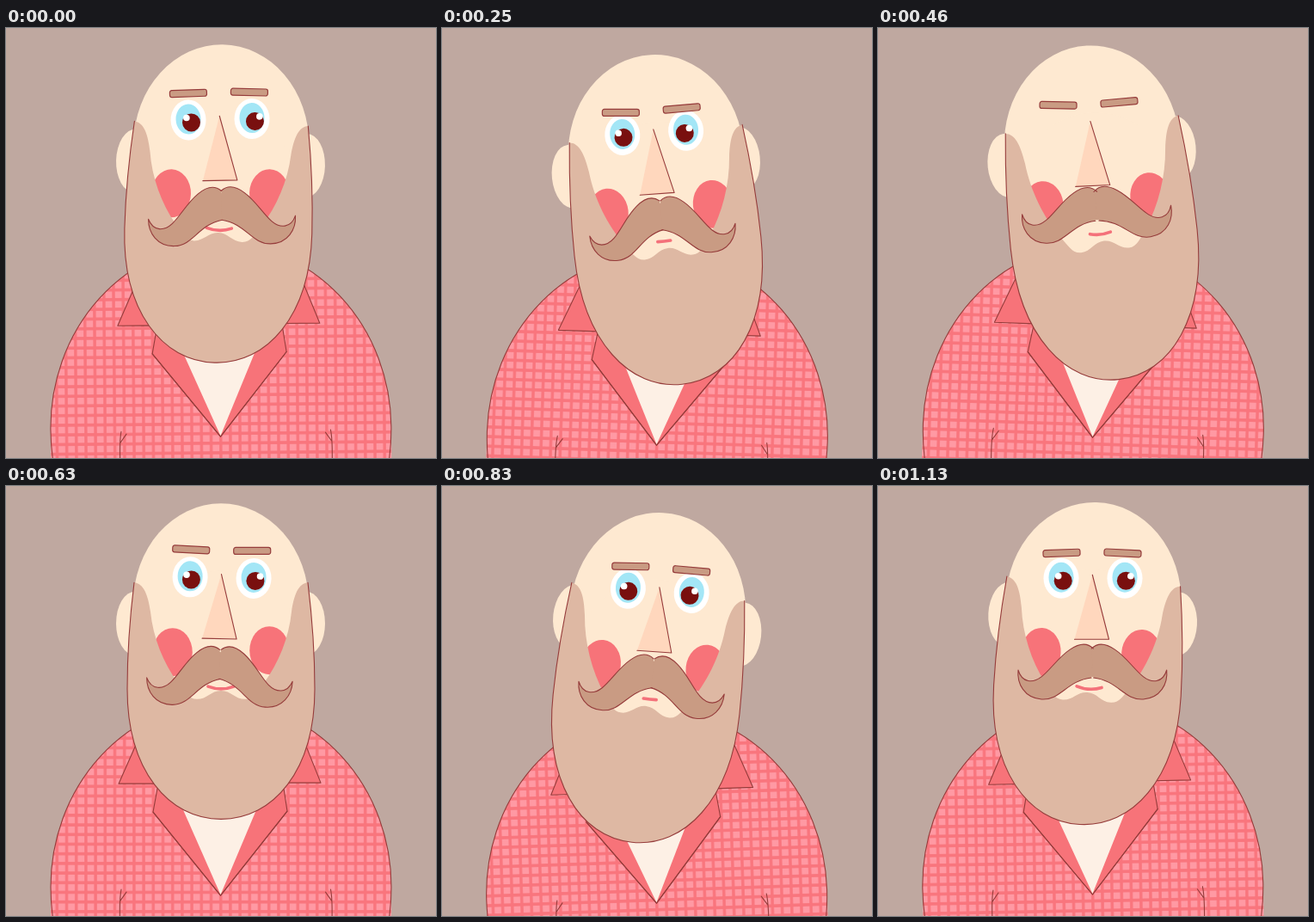
Animation, 500 px wide and 500 px high, one loop 1180 ms. Source, as an HTML page:

```html
<!DOCTYPE html>
<html lang="en">
<head>
<meta charset="utf-8">
<title>Bearded man bobbing</title>
<style>
  html, body { margin: 0; width: 100%; height: 100%; overflow: hidden; background: #bfa8a0; }
  svg { display: block; width: 100vw; height: 100vh; }
  .line { fill: none; stroke: #963c3b; stroke-width: 1.1; stroke-linejoin: round; stroke-linecap: round; }
  .skin { fill: #fee9d1; }
  .pink { fill: #f77379; }
  .hair { fill: #c99b83; }
  .collar { fill: #f77379; stroke: #963c3b; stroke-width: 1.1; stroke-linejoin: round; }
</style>
</head>
<body>
<svg viewBox="0 0 500 500">
  <defs>
    <pattern id="plaid" x="81.7" y="370.5" width="11.2" height="11.2" patternUnits="userSpaceOnUse">
      <rect width="11.2" height="11.2" fill="#f9757d"/>
      <rect x="1.7" y="1.8" width="7.8" height="7.6" fill="#ff99a3"/>
    </pattern>
    <path id="wing" d="M0,1 C-8,-6 -17,-4 -27,4 C-40,14 -48,29 -58,38 C-67,46 -80,47 -85.5,32 C-86,48 -76,64 -56,64 C-34,64 -28,40 0,35"/>
    <g id="sleeve">
      <path class="line" d="M134,468 C132,478 132,490 133,540 M133,481 L140,471"/>
    </g>
  </defs>
  <rect width="500" height="500" fill="#bfa8a0"/>

  <g id="shirt">
    <path d="M52,560 V465 A198,215 0 0 1 448,465 V560 Z" fill="url(#plaid)"/>
    <path class="line" d="M55,505 Q52,485 52,465 A198,215 0 0 1 448,465 Q448,485 445,505"/>
    <use href="#sleeve"/>
    <use href="#sleeve" transform="translate(511.5) scale(-1 1)"/>
    <path class="collar" d="M158,284 L131,345 H177 L171,378 L249.5,475 L327,377 L322,344 H366 L342,284 Z"/>
    <path d="M193.5,347 L249.5,474 L303,347 Z" fill="#fdf0e5"/>
    <path class="line" d="M171,378 L249.5,475 L327,377"/>
  </g>

  <g id="head">
    <g id="ears">
      <ellipse class="skin" cx="150" cy="157" rx="22" ry="37"/>
      <ellipse class="skin" cx="349" cy="157" rx="22" ry="37"/>
    </g>
    <ellipse id="skull" class="skin" cx="250" cy="135" rx="102" ry="116"/>
    <ellipse class="skin" cx="250" cy="192" rx="92" ry="95"/>
    <ellipse id="cheekL" class="pink" cx="193" cy="193" rx="23" ry="28"/>
    <ellipse id="cheekR" class="pink" cx="307" cy="191" rx="23" ry="28"/>
    <g id="beard">
      <path fill="#deb8a3" d="M-101,111 C-90,112 -85,125 -82,145 C-79,175 -67,205 -50,228 C-42,238 -38,247 -28,247 C-16,247 -12,237 0,237 C12,237 16,247 28,247 C38,247 42,238 50,228 C67,205 79,175 82,145 C85,125 90,112 101,111 C107,160 109,210 109,235 C109,330 61,387 0,387 C-61,387 -109,330 -109,235 C-109,210 -107,160 -101,111 Z"/>
      <path class="line" d="M101,111 C107,160 109,210 109,235 C109,330 61,387 0,387 C-61,387 -109,330 -109,235 C-109,210 -107,160 -101,111"/>
    </g>
    <path id="mouth" fill="none" stroke="#f4717a" stroke-width="3.6" stroke-linecap="round"/>
  </g>

  <g id="face">
    <g id="features">
      <path d="M249.3,102 L268.5,177 H228.5 Z" fill="#ffd7bd"/>
      <path class="line" d="M249.3,102 L268.5,177 H228.5"/>
      <g id="eyeL"></g>
      <g id="eyeR"></g>
    </g>
    <g id="mustache">
      <path class="hair" d="M-6,2 L0,4 L6,2 V33 L0,34 L-6,33 Z"/>
      <use class="hair wing" href="#wing"/>
      <g transform="scale(-1 1)"><use class="hair wing" href="#wing"/></g>
      <use class="line wing" href="#wing"/>
      <g transform="scale(-1 1)"><use class="line wing" href="#wing"/></g>
    </g>
  </g>

  <g id="brows">
    <rect id="browL" class="hair" x="-21.5" y="-4" width="43" height="8" rx="2.5" stroke="#963c3b" stroke-width="1.2"/>
    <rect id="browR" class="hair" x="-21.5" y="-4" width="43" height="8" rx="2.5" stroke="#963c3b" stroke-width="1.2"/>
  </g>
</svg>

<script>
const $ = id => document.getElementById(id);
const put = (id, value) => $(id).setAttribute('transform', value);

const LOOP = 1180, STEPS = 28, HALF = 14;
const starts = Array.from({ length: STEPS }, (_, k) => Math.round(k * 100 / 24) * 10);

// Smooth periodic curve through [step, value] keys.
function spline(keys, period, sign = 1) {
  const pts = [];
  for (let n = -2; n <= 3; n++)
    for (const [k, v] of keys) pts.push([k + n * period, n % 2 ? v * sign : v]);
  const slope = i => (pts[i + 1][1] - pts[i - 1][1]) / (pts[i + 1][0] - pts[i - 1][0]);
  return k => {
    let i = 1;
    while (pts[i + 1][0] <= k) i++;
    const [a, va] = pts[i], [b, vb] = pts[i + 1];
    const d = b - a, u = (k - a) / d, w = 1 - u;
    return va * (1 + 2 * u) * w * w + vb * u * u * (3 - 2 * u)
      + d * u * w * (slope(i) * w - slope(i + 1) * u);
  };
}
const sway = keys => spline(keys, HALF, -1);   // mirrored in the second half
const bounce = keys => spline(keys, HALF);     // same in both halves

const lean = sway([[0, -.27], [1, 0], [6, 1], [10, 1], [11, 1], [13, .55]]);
const faceTurn = sway([[0, -1.1], [1, -1.2], [6, -4], [10, -3.2], [11, -2.8], [13, 0]]);
const stretch = bounce([[0, 0], [1, -3], [6, 15], [10, 24], [11, 20], [13, 5]]);
const droop = bounce([[0, 0], [1, 2.5], [6, 2], [10, -6.5], [11, -6.5], [13, -4]]);
const mouthWidth = bounce([[0, 29], [1, 30], [6, 15], [10, 21], [11, 24], [13, 29]]);
const browTilt = spline([[0, -2], [6, 0], [11, 1], [15, 3], [20, 1], [24, -1], [27, -2]], STEPS);
const gaze = spline([[0, 3], [6, 0], [11, 0], [15, .5], [20, -.5], [24, 0], [27, 1.5]], STEPS);

const drop = k => 12 * Math.pow((1 + Math.cos((k - 6) * 2 * Math.PI / HALF)) / 2, 1.3);

for (const [id, side] of [['eyeL', -1], ['eyeR', 1]]) {
  $(id).innerHTML = `
    <ellipse rx="20.5" ry="23.5" fill="#fff"/>
    <ellipse cy="-1" rx="14.5" ry="17.5" fill="#a3e6f6"/>
    <g id="${id}P">
      <circle r="10.5" fill="#79100f"/>
      <circle cx="${side * 5.5}" cy="-5.5" r="3.8" fill="#fff"/>
    </g>`;
}

function draw(k) {
  const s = lean(k), turn = faceTurn(k), y = drop(k), st = stretch(k);
  const lag = st * .25;

  put('shirt', `translate(0 ${y * .85}) rotate(${s * 1.9} 249.5 475)`);

  put('head', `translate(0 ${y}) rotate(${-6 * s} 250 157)`);
  put('ears', `translate(0 ${-st * .45})`);
  put('skull', `rotate(${3 * s} 250 157)`);
  put('cheekL', `translate(${-lag} ${lag * 1.6 - 2.5 * s})`);
  put('cheekR', `translate(${lag} ${lag * 1.6 + 2.5 * s})`);
  put('beard', `translate(${250 + 3.5 * s} 110) scale(1 ${1 + (st + 2) / 277}) translate(0 -110)`);
  const w = mouthWidth(k) / 2, curl = (w - 7) * .7;
  $('mouth').setAttribute('d', `M${250 - w},${232.5 + lag} q${w},${curl} ${2 * w},0`);

  put('face', `translate(0 ${y}) rotate(${turn} 250 157)`);
  put('features', `translate(0 ${lag})`);
  const open = Math.min(1, Math.abs(k - 11) / 2);
  for (const [id, x, cross] of [['eyeL', 213, 0], ['eyeR', 287, st * .17]]) {
    put(id, `translate(${x} 106) scale(1 ${open})`);
    $(id).style.display = open ? '' : 'none';
    put(id + 'P', `translate(${1 + gaze(k) * .8 - cross} 3)`);
  }

  put('mustache', `translate(${250 + s * 1.2} 188) rotate(${turn * .25})`);
  for (const el of document.querySelectorAll('.wing'))
    el.setAttribute('transform', `rotate(${-droop(k)} 0 17)`);

  put('brows', `translate(-1 ${y + st * .58}) rotate(${turn} 250 157)`);
  put('browL', `translate(214.5 75) rotate(${browTilt(k) - turn})`);
  put('browR', `translate(285.5 75) rotate(${-5 * s - turn})`);
}

const origin = performance.now();
let shown = -1;
function tick() {
  const t = (performance.now() - origin) % LOOP;
  let k = STEPS - 1;
  while (starts[k] > t) k--;
  if (k !== shown) draw(shown = k);
  requestAnimationFrame(tick);
}
tick();
</script>
</body>
</html>
```
